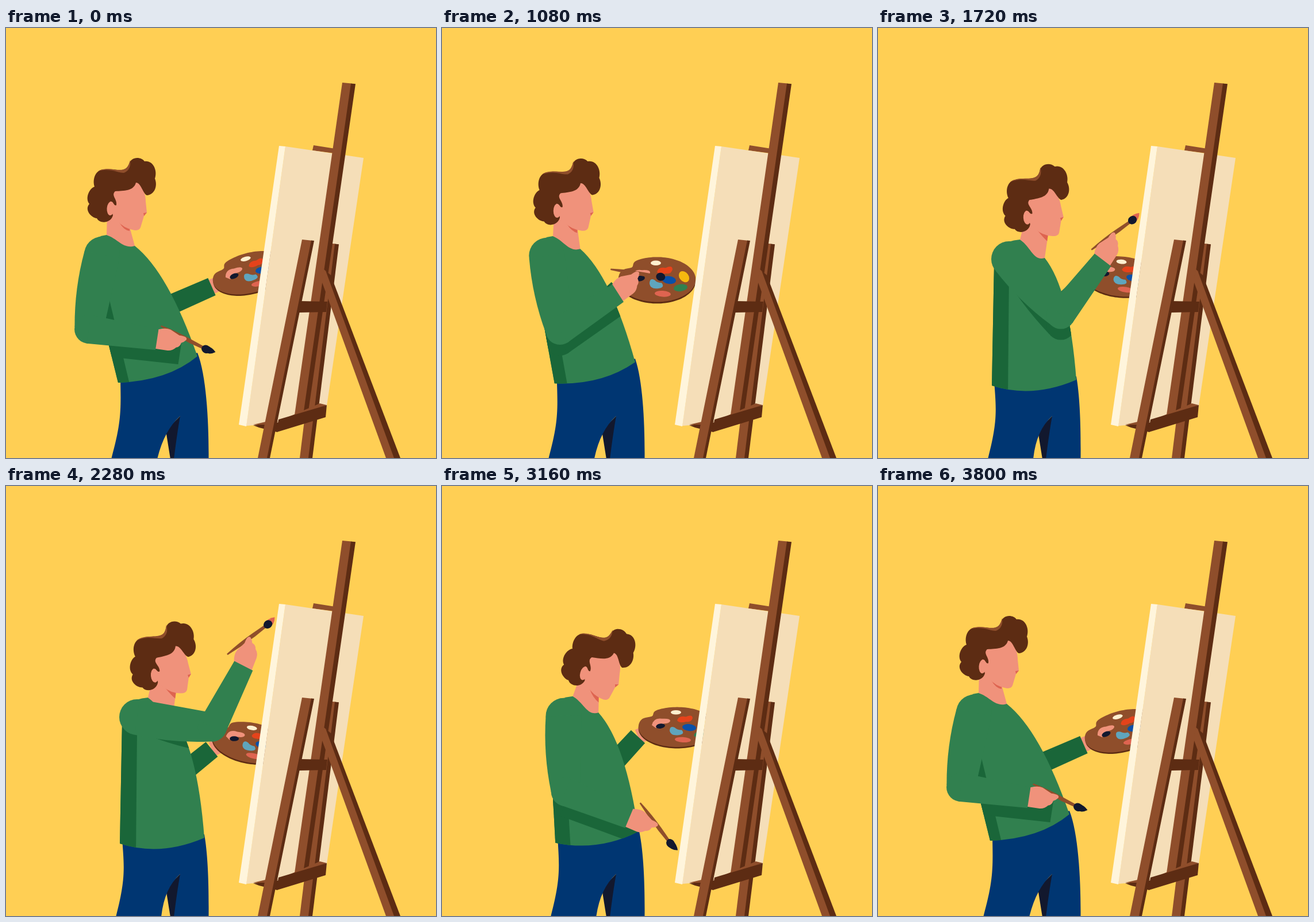
Animation of 748 by 748 pixels, one loop 3.84 s. Source, as an HTML page with a canvas:

```html
<!DOCTYPE html>
<html lang="en">
<head>
<meta charset="utf-8">
<title>Painter at the easel</title>
<style>
html, body { margin: 0; width: 100%; height: 100%; overflow: hidden; background: #ffcf54; }
canvas { display: block; width: 748px; height: 748px; }
</style>
</head>
<body>
<canvas id="stage" width="748" height="748"></canvas>
<script>
const ctx = document.getElementById('stage').getContext('2d');
const LOOP = 3840, STEP = 40, RAD = Math.PI / 180;
const UPPER = 132, LOWER = 120;
const C = {
  bg: '#ffcf54', wood: '#8f4e2b', bark: '#5d2c13', face: '#f5deb8', edge: '#fff5dc',
  green: '#31804f', shade: '#1a6639', pants: '#003672', ink: '#12182e',
  skin: '#f0927b', blush: '#de6450'
};

// Monotone cubic through a few key points {time: value}
function track(keys) {
  const k = Object.entries(keys).map(([t, v]) => [+t, v]), last = k.length - 1;
  const slope = i => (k[i + 1][1] - k[i][1]) / (k[i + 1][0] - k[i][0]);
  const tangent = i => {
    if (i === 0 || i === last) return 0;
    const a = slope(i - 1), b = slope(i);
    return a * b <= 0 ? 0 : 2 * a * b / (a + b);
  };
  return t => {
    if (t >= k[last][0]) return k[last][1];
    const i = k.findIndex(([time]) => time > t) - 1;
    const h = k[i + 1][0] - k[i][0], u = (t - k[i][0]) / h, v = 1 - u;
    return k[i][1] * (1 + 2 * u) * v * v + k[i + 1][1] * u * u * (3 - 2 * u)
      + h * u * v * (v * tangent(i) - u * tangent(i + 1));
  };
}

const leanAt = track({ 0: 0, 440: .09, 1080: .25, 1680: 1, 2800: 1, 3160: .73, 3800: 0 });
const tiltAt = track({ 0: 0, 1080: -4, 2280: -9, 2800: -6, 3160: 11.5, 3800: 0 });
const upperAt = track({ 0: 100, 440: 84, 1080: 80, 1720: 47, 2280: 7.7, 2800: 68, 3160: 88.6, 3800: 100 });
const lowerAt = track({ 0: 8.7, 440: -26.6, 1080: -32.6, 1720: -52.5, 2280: -63, 2800: 0, 3160: 22.7, 3800: 8.7 });
const brushAt = track({ 0: 27, 440: 31, 1080: 8.4, 1720: -36, 2280: -36.7, 3160: 53, 3800: 27 });
const boardX = track({ 0: 397, 440: 337, 1080: 345, 1680: 394, 2280: 397, 3160: 380, 3800: 397 });
const boardY = track({ 0: 432, 440: 455, 1080: 436, 1680: 428, 2280: 440, 3160: 418, 3800: 432 });
const boardTilt = track({ 0: -15, 440: 12, 1080: 0, 2280: 10, 3160: 0, 3800: -15 });

// Soft humps for mixing paint and for the two dabs on the canvas
const hump = (t, from, to, period) => t > from && t < to ? Math.sin(Math.PI * (t - from) / period) ** 2 : 0;
const mixing = t => hump(t, 0, 1500, 1500);
const dab = t => hump(t, 1960, 2600, 320);

function fill(color, path) {
  ctx.fillStyle = color;
  ctx.fill(path);
}
const svg = (color, d) => fill(color, new Path2D(d));
const poly = (color, ...pts) => svg(color, 'M' + pts.join(' ') + 'Z');

function oval(color, x, y, rx, ry, deg = 0) {
  const p = new Path2D();
  p.ellipse(x, y, rx, ry, deg * RAD, 0, 7);
  fill(color, p);
}

function local(x, y, deg, draw) {
  ctx.save();
  ctx.translate(x, y);
  ctx.rotate(deg * RAD);
  draw();
  ctx.restore();
}

function within(path, draw) {
  ctx.save();
  ctx.clip(path);
  draw();
  ctx.restore();
}

const polar = ([x, y], deg, r) => [x + Math.cos(deg * RAD) * r, y + Math.sin(deg * RAD) * r];

// Tapered bar; bulge swells its outer side
function taper(color, a, b, ra, rb, bulge = 0) {
  const g = Math.atan2(b[1] - a[1], b[0] - a[0]) / RAD;
  const mid = [(a[0] + b[0]) / 2, (a[1] + b[1]) / 2];
  svg(color, `M${polar(a, g - 90, ra)}L${polar(b, g - 90, rb)}L${polar(b, g + 90, rb)}
    Q${polar(mid, g + 90, (ra + rb) / 2 + bulge)} ${polar(a, g + 90, ra)}Z`);
}

function limb(color, shoulder, elbow, wrist, r) {
  oval(color, ...shoulder, r, r);
  taper(color, shoulder, elbow, r, 25, 9);
  oval(color, ...elbow, 25, 25);
  taper(color, elbow, wrist, 25, 18);
}

// Oval board with a dent near the thumb
const BOARD = (() => {
  const p = new Path2D();
  for (let a = 0; a < 360; a += 3) {
    const r = 1.02 - .16 * Math.exp(-(((a - 220) / 10) ** 2));
    p.lineTo(29 + 66 * r * Math.cos(a * RAD), 2 + 40 * r * Math.sin(a * RAD));
  }
  p.closePath();
  return p;
})();

function drawPalette(t, elbow) {
  const hole = [boardX(t), boardY(t)], wrist = [hole[0] - 39, hole[1] + 18];
  taper(C.skin, wrist, hole, 13, 12);
  taper(C.shade, elbow, wrist, 18, 16.5);
  local(...hole, boardTilt(t), () => {
    ctx.scale(1, .85 + .18 * mixing(t));
    ctx.translate(0, 2.5);
    fill(C.bark, BOARD);
    ctx.translate(0, -3);
    fill(C.wood, BOARD);
    oval('#fff0cf', 27, -28, 9, 4.5);
    svg('#e5431b', 'M29 -12Q32 -22 44 -19Q56 -25 56 -16Q53 -7 45 -9Q32 -5 29 -12Z');
    oval('#f6b90f', 76, -3, 8, 11, -35);
    oval('#0a50a8', 50, 3, 12, 7, 8);
    svg('#5fa5bd', 'M16 10Q16 -2 25 3Q29 8 37 8Q43 16 33 18Q18 21 16 10Z');
    oval(C.green, 70, 17, 12, 6.5, -8);
    oval(C.blush, 39, 28, 14, 5.5, 4);
    svg(C.skin, 'M-15 -2Q-12 -18 3 -15Q18 -16 17 -10Q15 -5 6 -5L-8 4Z');
    oval(C.ink, 0, 0, 8, 5, -12);
  });
}

function drawPants(mix, hemL, hemR) {
  svg(C.ink, 'M304 674L278 700L286 750L294 750Z');
  svg(C.pants, `M${hemL[0] + 4} ${hemL[1] - 8}C${mix(200, 206)} 665 ${mix(201, 208)} 685 ${mix(183, 191)} 750
    H${mix(263, 270)}Q275 700 303 675Q298 702 292 750H352.5
    C353 690 ${mix(349, 351)} ${mix(605, 640)} ${hemR[0]} ${hemR[1] - 6}Z`);
}

function drawHead(x, y, tilt) {
  local(x, y, tilt, () => {
    ctx.translate(-181, -314);
    svg(C.skin, `M184 280L228 266C238 273 243 290 243 302L245 321Q242 325 240 327L234 347
      Q231 354 220 351Q205 348 194 336L178 324Z`);
    svg(C.blush, 'M245 321L239 322Q240 326 240 327Z');
    svg(C.bark, `M186 326C182 340 163 341 158 331C148 330 136 316 145 306C137 296 145 279 154 276
      C150 264 155 246 171 246C190 243 206 255 214 237C217 224 234 223 241 232
      C256 230 264 248 259 262C264 274 259 290 245 291C238 288 235 269 226 269
      C222 284 205 283 190 284C182 291 194 298 192 308C188 311 186 300 181 302Z`);
    svg(C.wood, 'M160 249C177 239 199 253 210 243Q214 238 216 230Q218 247 205 252C193 252 183 243 160 249Z');
    oval(C.skin, 182, 314, 6.5, 12, 4);
  });
}

function drawBrush(grip, deg, tip, color) {
  local(...grip, deg, () => {
    ctx.translate(-45, 0);
    svg(C.wood, 'M0 -1.5Q30 -4.5 58 -3.5L84 -2.5V2.5L58 3.5Q30 3.5 0 1Z');
    svg(color, `M86 -6Q96 -8 ${90 + 15 * tip} ${-3 * tip}Q98 7 86 6Z`);
    oval(C.ink, 88, 0, 8, 7);
  });
}

// Light bar with a dark right side
function beam(x0, y0, x1, y1, w, side) {
  const strip = (color, a, b) =>
    poly(color, [x0 + a, y0 + a * .1], [x0 + b, y0 + b * .1], [x1 + b, y1], [x1 + a, y1]);
  strip(C.wood, 0, w + 1);
  strip(C.bark, w, w + side);
}

function drawEasel() {
  poly(C.wood, [535, 204], [573, 210], [572, 218], [533, 213]);
  poly(C.face, [486, 206], [622, 226], [557, 664], [470, 688], [418, 692]);
  poly(C.edge, [475, 205], [486, 206], [418, 693], [405, 690]);
  beam(557, 374, 511, 748, 15, 7);
  beam(585, 95, 502, 673, 15, 8);
  poly(C.bark, [511, 475], [559, 476], [557, 494], [508, 495]);
  // rear leg
  poly(C.wood, [553, 420], [563, 428], [676, 748], [661, 748], [549, 440]);
  poly(C.bark, [556, 422], [565, 430], [686, 748], [675, 748]);
  // shelf around the left post
  poly(C.bark, [430, 691], [474, 686], [472, 703], [440, 695]);
  poly(C.wood, [430, 690], [456, 684], [474, 684], [462, 690]);
  beam(515, 368, 438, 748, 16, 5);
  poly(C.wood, [474, 684], [546, 653], [558, 656], [474, 687]);
  poly(C.bark, [474, 681], [558, 656], [556, 677], [471, 703]);
}

function render(t) {
  const lean = leanAt(t), tilt = tiltAt(t), raise = dab(t);
  const mix = (a, b) => a + (b - a) * lean;

  const nx = mix(175, 247), ny = mix(360, 368);
  const collar = [nx + mix(49, 43), ny + mix(19, 32)];
  const hemL = [mix(195, 198), mix(617, 622)], hemR = [mix(333, 345), mix(571, 612)];
  const ear = [nx + mix(6, 15) + tilt / 2, ny + mix(-46, -38)];

  const shoulder = [nx - mix(8, 19), ny + 34];
  const elbow = polar(shoulder, upperAt(t) - 4 * raise, UPPER);
  const forearm = lowerAt(t) - raise;
  const wrist = polar(elbow, forearm, LOWER);
  const hand = forearm * 1.07 - 10;
  const back = [shoulder[0] - 26, shoulder[1] + 5];

  ctx.fillStyle = C.bg;
  ctx.fillRect(0, 0, 748, 748);
  drawPalette(t, [nx + mix(67, 23), ny + mix(141, 161)]);
  drawPants(mix, hemL, hemR);

  const torso = new Path2D(`M${nx} ${ny}Q${back[0]} ${ny + 4} ${back}L${hemL}
    Q${mix(281, 268)} ${mix(614, 645)} ${hemR}
    Q${collar[0] + mix(58, 43)} ${collar[1] + mix(46, 54)} ${collar}Z`);
  fill(C.green, torso);
  within(torso, () => {
    poly(C.shade, back, [back[0] + 26, back[1] + 20], [mix(220, 226), 640], [hemL[0] - 5, 640]);
    const below = ([x, y]) => [x, y + 19];
    limb(C.shade, shoulder, below(elbow), below(polar(wrist, forearm, 40)), 22);
  });

  // neck and the shadow below the jaw
  const onHead = (x, y) => polar(ear, tilt + Math.atan2(y, x) / RAD, Math.hypot(x, y));
  const throat = onHead(34, 32);
  const neck = new Path2D(`M${onHead(-5, 8)}L${nx} ${ny}C${nx + 20} ${ny + mix(7, 14)}
    ${collar[0] - 20} ${collar[1] + 6} ${collar}L${throat}Z`);
  fill(C.skin, neck);
  within(neck, () => svg(C.blush,
    `M${onHead(16, 24)}Q${onHead(24, 38)} ${throat[0]} ${throat[1] + mix(7, 15)}L${throat}Z`));
  drawHead(...ear, tilt);

  const grip = polar(wrist, hand - 3, 47);
  drawBrush(grip, brushAt(t), 1 - Math.min(1, 2 * mixing(t)), t > 700 && t < 2420 ? C.blush : C.ink);
  local(...wrist, hand, () => svg(C.skin,
    'M-14 -15L4 -18Q16 -21 24 -17L39 -7Q54 -5 51 1Q47 5 42 6Q40 13 33 14Q26 20 18 19L-14 14Z'));
  limb(C.green, shoulder, elbow, wrist, 31);
  drawEasel();
}

const start = performance.now();
function tick() {
  const t = (performance.now() - start) % LOOP;
  render(Math.floor(t / STEP) * STEP);
  requestAnimationFrame(tick);
}
tick();
</script>
</body>
</html>
```
